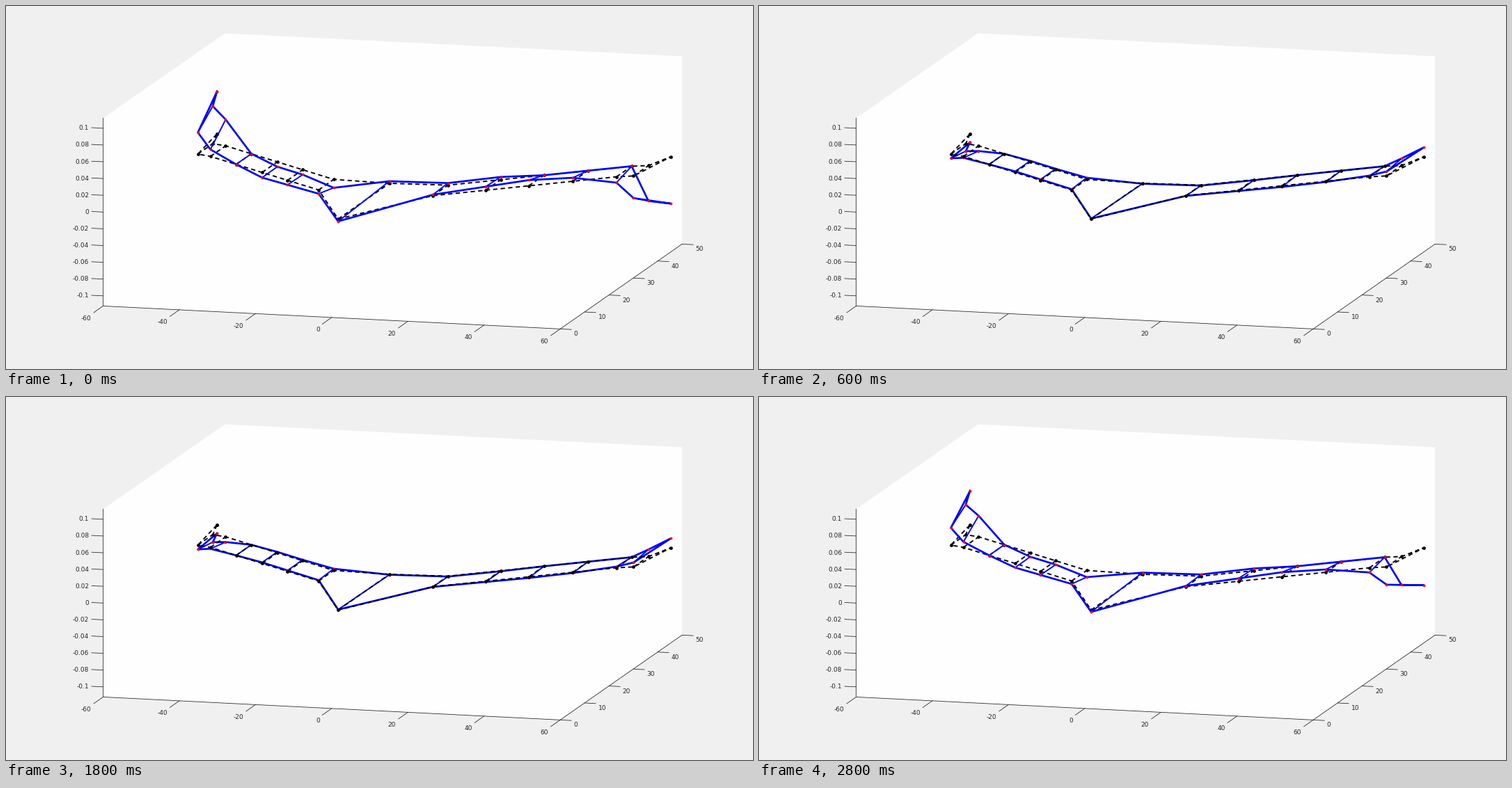
A matplotlib script that plays this animation: 1073x522 px, repeating every 3000 ms.

```python
import numpy as np
import matplotlib.pyplot as plt
from matplotlib.animation import FuncAnimation

W, H, DPI = 1073, 522, 100
PT = 72 / DPI  # points per pixel
INK = "#262626"
TOP = 0.1121  # half height of the axes box
STEPS, FALL = 15, 5

# Wing stations, mirrored about the root
HALF = np.array([15, 26, 35, 44.2, 53.3, 57.2])
SPAN = np.concatenate([-HALF[::-1], [0], HALF])
TIP = 59.6

# Planform edges: (distance from root, depth)
FRONT = [(0, 2.65), (15, 18.1), (53.3, 33.55), (57.2, 34.5)]
BACK = [(0, 23.7), (15, 24.3), (53.3, 39.8), (57.2, 40.6), (TIP, 46.1)]

# Mode shape of each edge: (span position, lift in thousandths)
FRONT_MODE = [(-57.2, 25.7), (-53.3, 8.3), (-44.2, 0), (-35, -6.2), (-15, -4.5),
              (0, -2.8), (15, 1.2), (35, 6.8), (44.2, 4.2), (53.3, -7), (57.2, -26.5)]
BACK_MODE = [(-TIP, 50.6), (-57.2, 44.8), (-44.2, 0), (-35, -5.8), (-26, -5.8),
             (-15, -10), (0, 2.5), (15, 2.5), (26, 3.3), (35, 0), (53.3, 0),
             (57.2, -42.3), (TIP, -56)]

fig = plt.figure(figsize=(W / DPI, H / DPI), dpi=DPI, facecolor="#f0f0f0")
ax = fig.add_axes([0, 0, 1, 1])
ax.set_xlim(0, W)
ax.set_ylim(H, 0)
ax.axis("off")


def project(x, y, z):
    """Orthographic view from data space to pixels."""
    return np.array([467.8 + 5.471 * x + 3.5 * y,
                     312.8 + 0.275 * x - 2.44 * y - 1205 * z])


def curve(keys, x):
    return np.interp(x, *zip(*keys))


def edge(plan, mode, x, s):
    return project(x, curve(plan, abs(x)), s * curve(mode, x) / 1000)


def wing(s):
    """Paths of the ribs, split by gaps, and of the closed outline."""
    front = edge(FRONT, FRONT_MODE, SPAN, s)
    back = edge(BACK, BACK_MODE, np.concatenate([[-TIP], SPAN, [TIP]]), s)
    gap = np.full_like(front, np.nan)
    ribs = np.stack([front, back[:, 1:-1], gap], axis=2).reshape(2, -1)
    rim = np.hstack([back, front[:, ::-1], back[:, :1]])
    return ribs, rim


def line(path, color, width, **kw):
    return ax.plot(*path, color=color, lw=width * PT, **kw)[0]


def tick(start, step, offset, text, align):
    x, y = start
    line(([x, x + step[0]], [y, y + step[1]]), INK, 0.8, zorder=1)
    ax.text(x + offset[0], y + offset[1] + 3.4, text, ha=align, va="baseline",
            color=INK, family="DejaVu Sans", size=9 * PT)


def draw_axes():
    box = [(-60, 0, TOP), (-60, 50, TOP), (60, 50, TOP),
           (60, 50, -TOP), (60, 0, -TOP), (-60, 0, -TOP)]
    corners = np.array([project(*c) for c in box])
    ax.add_patch(plt.Polygon(corners, fc="#fefefe", ec="none", zorder=0))
    line(corners[[0, 5, 4, 3]].T, INK, 0.8, zorder=1)

    for i in range(-5, 6):
        tick(project(-60, 0, i / 50), (-16.5, -0.8), (-20.5, -0.8),
             f"{i / 50:g}", "right")
    for x in range(-60, 61, 20):
        tick(project(x, 0, -TOP), (-13.5, 9.5), (-17, 16.8), str(x), "right")
    for y in range(0, 51, 10):
        tick(project(60, y, -TOP), (16, 0.8), (19.5, 6.7), str(y), "left")


def draw_wing(color, dot, rim_width, dot_size, **kw):
    ribs, rim = wing(0)
    return (line(ribs, color, 1.9, **kw),
            line(rim, color, rim_width, **kw),
            line(rim, dot, 0, ls="none", marker="o", ms=dot_size * PT, mec="none"))


def deflection(k):
    """Fast swing from 1 to -1, then a slower return."""
    if k <= FALL:
        return 1 - 2 * k / FALL
    return (2 * k - STEPS - FALL) / (STEPS - FALL)


draw_axes()
rest = draw_wing("black", "black", 1.9, 4.8,
                 ls=(0, (3.3, 2.4)), dash_capstyle="butt")
bent = draw_wing("blue", "red", 2.7, 3.8)
for art in rest:
    art.set_zorder(3)


def update(k):
    s = deflection(k)
    ribs, rim = wing(s)
    for art, path in zip(bent, (ribs, rim, rim)):
        art.set_data(*path)
        art.set_zorder(4 if s >= 0 else 2)
    return bent


anim = FuncAnimation(fig, update, frames=STEPS, interval=200, repeat=True)
plt.show()
```
